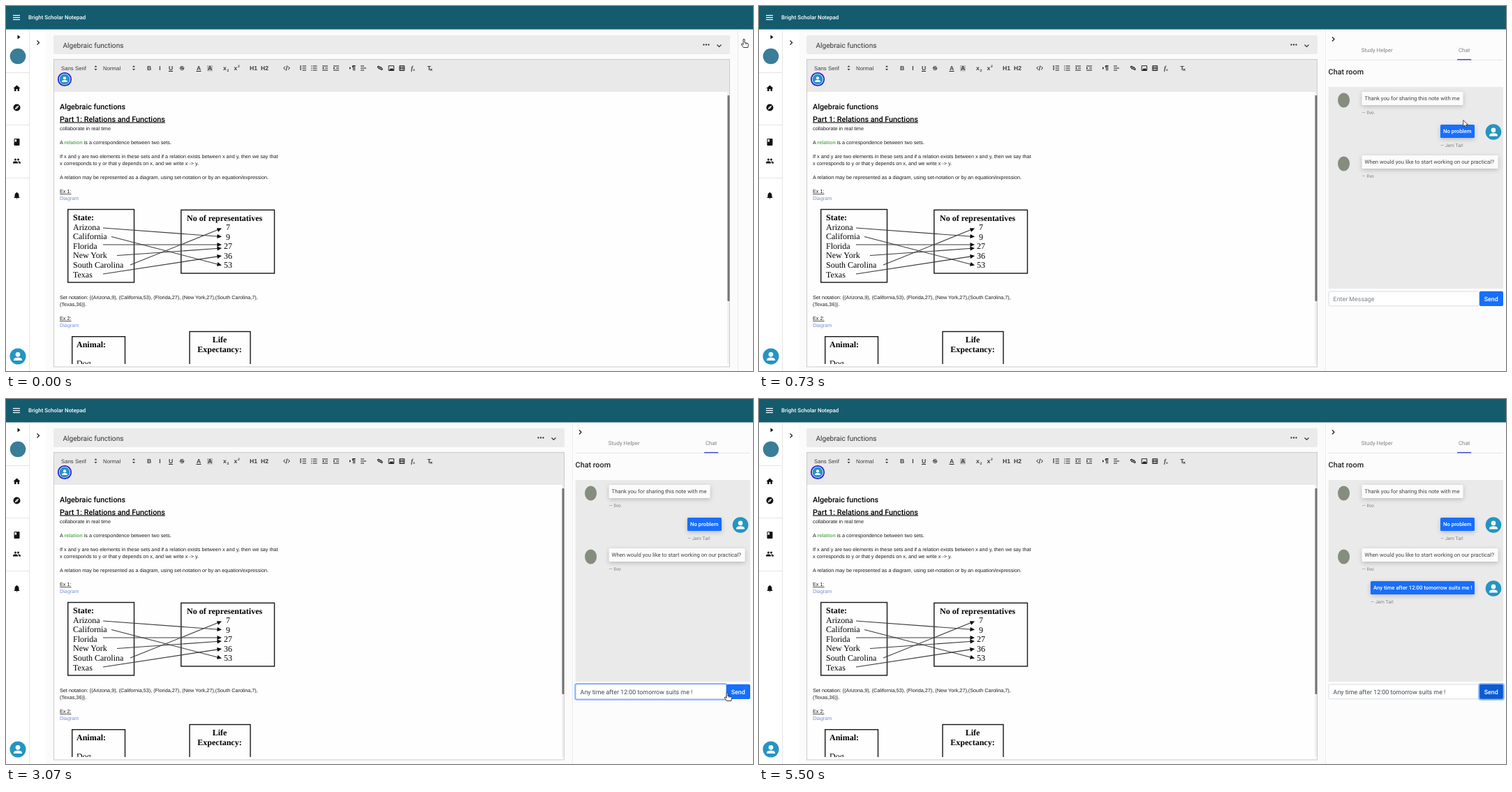
Recreate the animation shown at these times as an HTML page. Size 1070 px wide and 523 px high, loop 5.53 s.

```html
<!DOCTYPE html>
<html lang="en">
<head>
<meta charset="utf-8">
<title>Shared notes with chat</title>
<style>
  html, body { margin: 0; width: 100%; height: 100%; overflow: hidden; background: #fcfcfc; }
  svg { display: block; width: 100vw; height: 100vh; }
  text { font-family: Roboto, sans-serif; text-rendering: geometricPrecision; white-space: pre; }
  .note text { font: 7.25px "Liberation Sans", Arial, sans-serif; fill: #1c1c1c; }
  .note .head { font: 500 10.8px Roboto, sans-serif; fill: #000; }
  .note .link { fill: #7690d2; }
  .under { text-decoration: underline; }
  .diagram text { font: 12px "Liberation Serif", "Times New Roman", serif; fill: #000; }
  .diagram .bold { font-weight: bold; }
  .tools text { font: 7.8px "Liberation Sans", Arial, sans-serif; fill: #3c3c3c; }
  .tools .b { font-weight: bold; font-size: 8.6px; }
  .shadow { filter: drop-shadow(0 2px 3px #0003); }
</style>
</head>
<body>
<svg viewBox="0 0 1070 523" preserveAspectRatio="none">
  <defs>
    <clipPath id="page"><rect x="69" y="123" width="730" height="390"/></clipPath>
  </defs>
  <g id="frame"></g>
  <g id="fixed"></g>
  <g id="panel"></g>
  <g id="cursor"></g>
</svg>
<script>
const LOOP = 5530;
const REPLY = 'Any time after 12:00 tomorrow suits me !';
const BLUE = '#176eff';

const messages = [
  { text: 'Thank you for sharing this note with me', from: 'Ilvo', width: 145, since: 0 },
  { text: 'No problem', from: 'Jem Tarl', own: true, width: 49, since: 0 },
  { text: 'When would you like to start working on our practical?', from: 'Ilvo', width: 195, since: 0 },
  { text: REPLY, from: 'Jem Tarl', own: true, width: 149, since: 3400 },
];

// Cursor hot spot: time, x, y
const route = [
  [570, 1057, 47], [730, 1009, 163], [1150, 934, 385], [1480, 903, 417],
  [2880, 985, 418], [3070, 1033, 420], [3250, 1040, 421], [4080, 1040, 421], [4400, 1078, 436],
];

// Markup helpers
const rect = (x, y, w, h, fill, extra = '') =>
  `<rect x="${x}" y="${y}" width="${Math.max(0, w)}" height="${h}" fill="${fill}" ${extra}/>`;
const circle = (x, y, r, fill, extra = '') => `<circle cx="${x}" cy="${y}" r="${r}" fill="${fill}" ${extra}/>`;
const path = (d, stroke = '#222', width = 1, fill = 'none') =>
  `<path d="${d}" stroke="${stroke}" stroke-width="${width}" fill="${fill}"/>`;
const text = (x, y, content, extra = '') => `<text x="${x}" y="${y}" ${extra}>${content}</text>`;
const label = (x, y, content, size, fill, extra = '') =>
  text(x, y, content, `font-size="${size}" fill="${fill}" ${extra}`);
const icon = (x, y, d) =>
  `<path transform="translate(${x - 6} ${y - 6}) scale(.5)" d="${d}" fill="#111" fill-rule="evenodd"/>`;
const person = (x, y, r) => circle(x, y, r, '#2494c2') + circle(x, y - r * .23, r * .29, '#fff') +
  `<path d="M${x - r * .53} ${y + r * .53}v${-r * .08}q0 ${-r * .3} ${r * .53} ${-r * .3}t${r * .53} ${r * .3}v${r * .08}z" fill="#fff"/>`;

// Timing helpers
const clamp = v => Math.min(1, Math.max(0, v));
const mix = (a, b, p) => a + (b - a) * p;
function slide(x) {
  // cubic-bezier(.2, 0, 0, 1)
  let low = 0, high = 1;
  for (let i = 0; i < 24; i++) {
    const s = (low + high) / 2;
    if (.6 * s * (1 - s) ** 2 + s ** 3 < x) low = s; else high = s;
  }
  return 3 * low ** 2 - 2 * low ** 3;
}

function sidebar() {
  return rect(0, 34, 34, 489, '#fff') + rect(33, 34, 1, 489, '#e6e6e6') +
    rect(34, 34, 23, 489, '#fff') +
    [95, 170, 246].map(y => rect(0, y, 33, 1, '#e4e4e4')).join('') +
    path('M16.5 41.5l4 3-4 3z', 'none', 0, '#111') +
    path('M44.5 49.5l3 3-3 3', '#222', 1.3) +
    circle(17, 72, 11.3, '#397d98') +
    icon(15.5, 118, 'M10 20v-6h4v6h5v-8h3L12 3 2 12h3v8z') +
    icon(15.5, 145.5, 'M12 2a10 10 0 1 0 0 20 10 10 0 0 0 0-20zM14.2 14.2L6 18l3.8-8.2L18 6zM12 10.9a1.1 1.1 0 1 0 0 2.2 1.1 1.1 0 0 0 0-2.2z') +
    icon(15.5, 195, 'M6 2h12q2 0 2 2v16q0 2-2 2H6q-2 0-2-2V4q0-2 2-2zM6 4v8l2.5-1.5L11 12V4z') +
    icon(15.5, 222, 'M8 5a3 3 0 1 0 0 6 3 3 0 0 0 0-6zM16 5a3 3 0 1 0 0 6 3 3 0 0 0 0-6zM1 19v-2.5C1 12 15 12 15 16.5V19zM17 19v-2.5q0-2-2-3.4c3-.4 8 .9 8 3.4V19z') +
    icon(15.5, 271.5, 'M10 20h4a2 2 0 0 1-4 0zM18 16v-5q0-5-4.5-6.3V4a1.5 1.5 0 0 0-3 0v.7Q6 6 6 11v5l-2 2v1h16v-1z') +
    person(17, 502, 11.5);
}

function header() {
  return rect(0, 0, 1070, 33.5, '#145b6e') +
    [13.5, 16.5, 19.5].map(y => path(`M10 ${y}h10`, '#fff', 1.2)).join('') +
    label(32, 19, 'Bright Scholar Notepad', 7.9, '#fff', 'font-weight="500"');
}

function toolbar() {
  const lines = (x, ...widths) => widths.map((w, i) => path(`M${x} ${86 + i * 3}h${w}`)).join('');
  const sorter = x => path(`M${x - 2} 87.5l2-2.3 2 2.3zM${x - 2} 90l2 2.3 2-2.3z`, 'none', 0, '#333');
  const bold = (x, y, s, extra = '') => text(x, y, s, `class="b" text-anchor="middle" ${extra}`);
  const small = (x, y, s) => text(x, y, s, 'style="font-size:5px;font-weight:bold"');
  return '<g class="tools">' +
    text(79, 91.5, 'Sans Serif') + sorter(128.5) + text(139, 91.5, 'Normal') + sorter(183) +
    bold(205, 92, 'B') + bold(220.5, 92, 'I', 'font-style="italic"') +
    bold(236, 91.5, 'U') + path('M233 93.5h6') + bold(252, 92, 'S') + path('M248.5 89h7') +
    bold(276, 91.5, 'A') + path('M272.5 93.5h7') +
    rect(288, 85, 8, 8.5, '#bdbdbd') + bold(292, 92, 'A') +
    bold(313.5, 92, 'x') + small(316.5, 93.5, '2') + bold(329, 92, 'x') + small(332, 88, '2') +
    bold(354.5, 92, 'H1') + bold(370.5, 92, 'H2') +
    path('M400 86.5l-2.3 2.5 2.3 2.5M404 86.5l2.3 2.5-2.3 2.5M402.8 85.5l-1.6 7') +
    lines(424.5, 5.5, 5.5, 5.5) + path('M422 85v7', '#222', 1.1) +
    lines(439.5, 6, 6, 6) + path('M437 86h1.3M437 89h1.3M437 92h1.3') +
    [453, 469].map(x => lines(x, 8, 0, 8) + path(`M${x + 4} 89h4`)).join('') +
    path('M453 89l2.2-1.7v3.4zM471.2 89l-2.2-1.7v3.4zM492 87l2.2 2-2.2 2z', 'none', 0, '#222') +
    path('M497.5 85.5v7M499.5 85.5v7M500.5 85.5h-4q-1.5 1.7 1 3') +
    lines(508, 5, 8, 5) +
    path('M535.6 88.2l-1.3-1.6q-1.6-.8-2 1l2 2.2q1.5.7 2-.6M535 88.6q.5-1.6 2-.8l2 2.2q.3 2-1.6 1.3l-1.4-1.6', '#222', 1.2) +
    path('M548.2 85.7h7.4v6.8h-7.4z') + path('M549 92l2-3 1.3 1.3 1.2-1.6 1.7 3.3z', 'none', 0, '#222') +
    path('M563.7 85.7h7v6.8h-7zM565.7 86v6.5M568.7 86v6.5M563.7 89h7') +
    text(580, 92, 'f', 'style="font:italic bold 9px Liberation Serif,serif"') + small(583, 93, 'x') +
    bold(606, 92, 'T', 'font-style="italic"') + path('M607.5 89.8l3 3M610.5 89.8l-3 3') +
    '</g>' + circle(84, 105, 9.2, '#eef4f8', 'stroke="#2923d4" stroke-width="1.8"') + person(84, 105, 7.4);
}

function note() {
  const row = (y, content, extra) => text(77, y, content, extra);
  return '<g class="note">' +
    row(147.5, 'Algebraic functions', 'class="head"') +
    row(165.5, 'Part 1: Relations and Functions', 'class="head under"') +
    row(177.5, 'collaborate in real time') +
    row(198, 'A <tspan fill="#62b05e" font-weight="bold">relation</tspan> is a correspondence between two sets.') +
    row(217.7, 'If x and y are two elements in these sets and if a relation exists between x and y, then we say that') +
    row(227.9, 'x corresponds to y or that y depends on x, and we write x -&gt; y.') +
    row(248, 'A relation may be represented as a diagram, using set-notation or by an equation/expression.') +
    row(268, 'Ex 1:', 'class="under"') + row(278, 'Diagram', 'class="link"') +
    row(420, 'Set notation: {(Arizona,9), (California,53), (Florida,27), (New York,27),(South Carolina,7),') +
    row(430, '(Texas,36)}.') +
    row(450, 'Ex 2:', 'class="under"') + row(460, 'Diagram', 'class="link"') + '</g>';
}

function diagrams() {
  const box = (x, y, w, h) => rect(x, y, w, h, 'none', 'stroke="#161616" stroke-width="1.4"');
  const arrow = ([x, y, end]) => {
    const angle = Math.atan2(end - y, 309 - x) * 180 / Math.PI;
    return path(`M${x} ${y}L305 ${mix(y, end, (305 - x) / (309 - x))}`, '#3a3a3a', 1.1) +
      `<path d="M0 0l-6.5-3v6z" transform="translate(309 ${end}) rotate(${angle})"/>`;
  };
  const states = ['Arizona', 'California', 'Florida', 'New York', 'South Carolina', 'Texas'];
  return '<g class="diagram" clip-path="url(#page)">' +
    box(88.7, 291.5, 94.8, 104.5) + box(250.8, 292.3, 133.7, 90.7) +
    text(96, 307, 'State:', 'class="bold"') +
    states.map((name, i) => text(96, 320.5 + i * 13.6, name)).join('') +
    text(259, 307.5, 'No of representatives', 'class="bold"') +
    [7, 9, 27, 36, 53].map((n, i) => text(318, 321 + i * 13.6, n, 'text-anchor="middle"')).join('') +
    [[139, 318, 330.5], [151, 330.5, 371.5], [139, 342, 342], [159, 357.5, 347], [178, 371, 318.5], [139, 384, 358]].map(arrow).join('') +
    box(94.7, 473.7, 75.8, 60) + text(101, 488.5, 'Animal:', 'class="bold"') + text(101, 515.5, 'Dog') +
    box(263, 466.5, 87, 60) +
    text(306, 482, 'Life', 'class="bold" text-anchor="middle"') +
    text(306, 496, 'Expectancy:', 'class="bold" text-anchor="middle"') + '</g>';
}

function editorFrame(right) {
  const width = right - 68;
  return rect(57, 34, 1013, 489, '#fbfbfb') +
    rect(68, 42, width, 27, '#ebebeb', 'rx="2"') +
    rect(68.5, 76.5, width - 1, 440.5, '#fefefe', 'stroke="#cbcbcb"') +
    rect(69, 77, width - 2, 46, '#e9e9e9') +
    label(81.5, 60, 'Algebraic functions', 10.1, '#333') +
    [-37.5, -34, -30.5].map(dx => circle(right + dx, 55.5, 1.15, '#333')).join('') +
    path(`M${right - 18.5} 55.5l3 3 3-3`, '#333', 1.2) +
    rect(right - 4, 123, 3, 390, '#f1f1f1') + rect(right - 3.5, 128, 3, 295, '#757575', 'rx="1"');
}

function chatLog(t, left, right) {
  let y = 123, out = '';
  for (const { text: words, from, own, width, since } of messages) {
    if (t < since) break;
    const wrapped = !own && 48 + width > right - left - 1;
    const x = own ? right - 41 - width : left + (wrapped ? 8 : 48);
    out += own ? person(right - 14, y + 10.5, 11.3)
      : `<ellipse cx="${left + 22}" cy="${y + 12}" rx="8.5" ry="10.5" fill="#858d7e"/>`;
    if (wrapped) y += 27;
    out += rect(x, y, width, 19, own ? BLUE : '#fbfbfb', 'rx="1.5" class="shadow"') +
      label(x + 4, y + 12, words, 7.75, own ? '#fff' : '#444', own ? 'font-weight="500"' : '') +
      label(x, y + 32, '— ' + from, 6.7, '#808080');
    y += own ? 44 : 47;
  }
  return out;
}

function composer(t, left, right) {
  const focus = clamp((t - 1580) / 150) * (1 - clamp((t - 3180) / 150));
  const pressed = clamp((t - 3180) / 120);
  const typed = REPLY.slice(0, Math.max(0, Math.ceil((t - 1960) / 24)));
  const width = right - left - 34;
  const ring = (x, w, strength) =>
    rect(x - .8, 408, w + 1.6, 22.8, 'none', `rx="2.5" stroke="#86b6ff" stroke-width="2" opacity="${strength}"`);
  return rect(left + .5, 409, width - 1, 20.8, '#fff', 'rx="1.5" stroke="#d9dce0"') +
    ring(left + .5, width - 1, focus) +
    label(left + 7, 422.5, typed || 'Enter Message', 8.9, typed ? '#41474d' : '#7d848b') +
    (t > 1600 && !typed ? rect(left + 7, 413.5, .9, 11.5, '#222') : '') +
    rect(right - 34, 408.7, 34, 21.3, pressed ? '#0c5bd2' : BLUE, 'rx="2"') + ring(right - 34, 34, pressed) +
    label(right - 17.3, 422.5, 'Send', 8.9, '#fff', 'text-anchor="middle" font-weight="500"');
}

function sidePanel(t, p) {
  const edge = 1048 - 237 * p + 14 * p * (1 - p);
  const left = edge + 4.6, right = 1066 + 12 * (1 - p), width = right - left;
  const tab = (at, name) => label(left + width * at, 66, name, 7.9, '#808080', 'text-anchor="middle"');
  const back = rect(edge, 34, 1070 - edge, 489, '#fcfcfc') + rect(edge, 34, 1, 489, '#ececec');
  if (p < .02) return back;
  const ink = left + width * .777 + 180 * (1 - p);
  return back + path(`M${edge + 10} 44.5l3 3-3 3`, '#222', 1.3) +
    tab(.278, 'Study Helper') + tab(.777, 'Chat') +
    rect(left, 77, width, 1, '#e6e6e6') + rect(ink - 10, 76, 20, 1.5, '#4450dc') +
    label(left, 97.5, 'Chat room', 10.8, '#222', 'font-weight="500"') +
    rect(left, 116, width, 289, '#eaeaea') +
    chatLog(t, left, right) + composer(t, left, right);
}

function pointer(t) {
  if (t >= 4400 || (t > 1970 && t < 2880)) return '';
  const next = route.findIndex(stop => stop[0] > t);
  const [t1, x1, y1] = route[next], [t0, x0, y0] = route[Math.max(0, next - 1)];
  const p = t1 === t0 ? 0 : t > 1480 && t < 1980 ? 0 : clamp((t - t0) / (t1 - t0));
  const x = mix(x0, x1, p), y = mix(y0, y1, p);
  let shape;
  if (t < 600 || t >= 3050) {
    shape = path('M-1 1q1-1.6 2 0v4.5l4.2 1q1.6.5 1.3 2l-.8 4H-.5l-3.3-4.3q.2-1.7 1.6-.8L-1 8.5z', '#222', .9, '#fff') +
      path('M2.3 6v2M4.2 6.5v2', '#222', .6);
  } else if (y < 409) {
    shape = path('M0 0v9.3l2.2-2 1.5 3.4 1.5-.7-1.5-3.2h3z', '#222', .8, '#fff');
  } else {
    shape = path('M-2.2-4.5q2.2 0 2.2 1 0-1 2.2-1M0-3.5v8M-2.2 5q2.2 0 2.2-1 0 1 2.2 1', '#222', 1);
  }
  return `<g transform="translate(${x} ${y})">${shape}</g>`;
}

const layer = id => document.getElementById(id);
layer('fixed').innerHTML = sidebar() + header() + toolbar() + note() + diagrams();

function draw() {
  const t = performance.now() % LOOP;
  const p = slide(clamp((t - 10) / 600));
  layer('frame').innerHTML = editorFrame(1037 - 237 * p);
  layer('panel').innerHTML = sidePanel(t, p);
  layer('cursor').innerHTML = pointer(t);
  requestAnimationFrame(draw);
}
draw();
</script>
</body>
</html>
```
